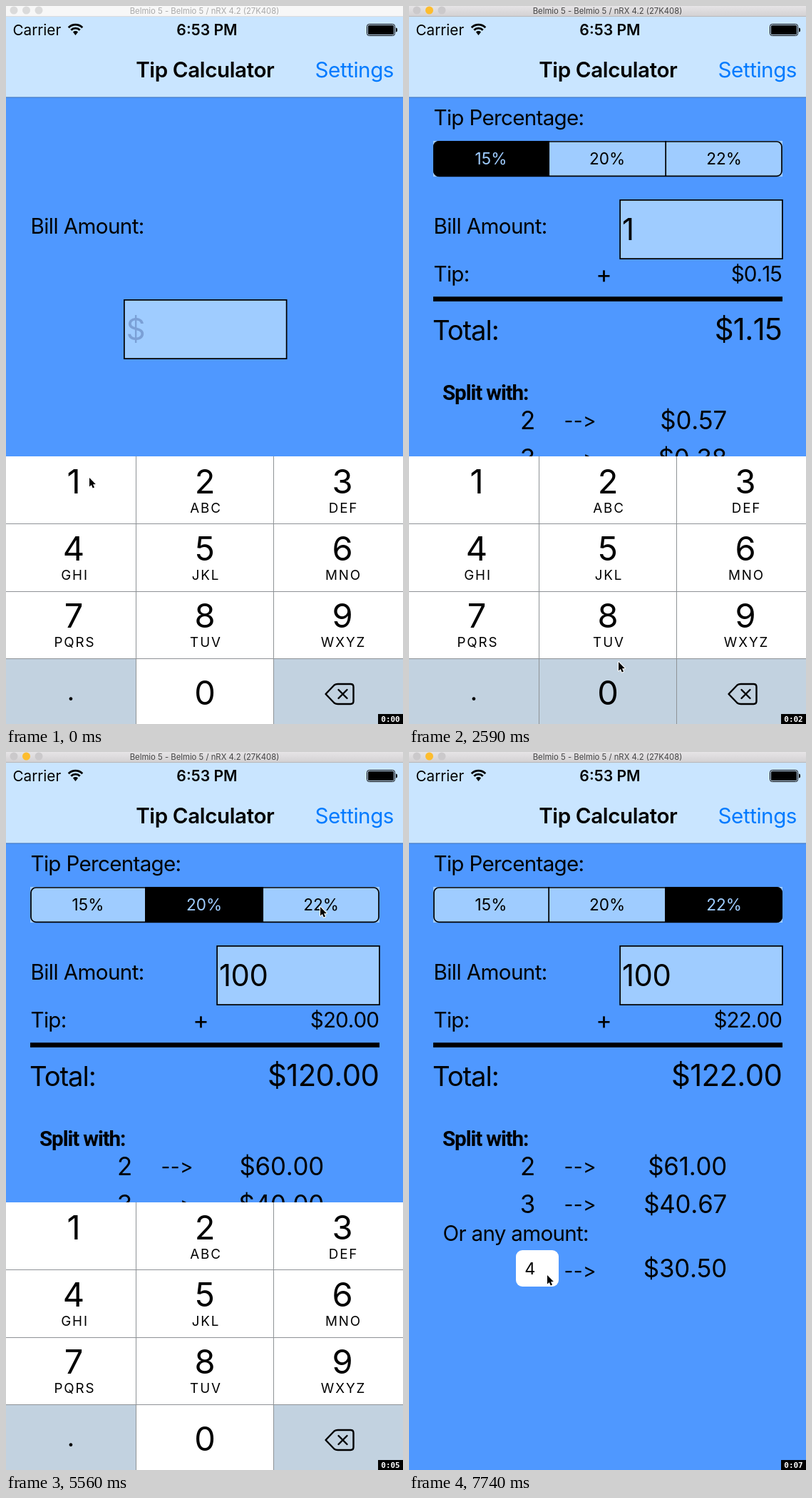
Write an HTML page with a canvas that moves like this. It is 557 px wide and 1006 px high and loops after 8000 ms.

```html
<!DOCTYPE html>
<html lang="en">
<head>
<meta charset="utf-8">
<title>Tip Calculator</title>
<style>
html, body { margin: 0; width: 100%; height: 100%; overflow: hidden; background: #4f98ff; }
canvas { display: block; }
</style>
</head>
<body>
<canvas id="stage" width="557" height="1006"></canvas>
<script>
const W = 557, H = 1006, LOOP = 8000;
const ctx = document.getElementById('stage').getContext('2d');

const BLUE = '#4f98ff', PALE = '#9fccff', BAR = '#c9e5ff', GREY_KEY = '#c2d2e0';
const UI = 'Inter, "Open Sans", sans-serif';
const TITLE = 'Belmio 5 - Belmio 5 / nRX 4.2 (27K408)';
const POINT = 1.74; // one screen point in pixels

const BURSTS = [0, 450, 1590, 2740, 3870, 5010, 6150, 6440, 7590];
const STEP = 137;

// Pointer path: time, x, y
const POINTER = [
  [0, 117, 661], [450, 117, 661], [600, 116, 664], [1000, 119, 668], [1270, 121, 672],
  [1730, 121, 672], [2400, 294, 919], [3290, 294, 919], [3700, 318, 520],
  [4010, 340, 320], [4418, 354, 238], [4690, 280, 214], [5010, 280, 214],
  [5284, 370, 212], [5558, 441, 217], [5832, 441, 217], [5969, 311, 521],
  [6150, 288, 539], [6300, 288, 539], [6577, 308, 779], [6850, 300, 775],
  [7399, 206, 737], [7727, 194, 733]
];

const BILL = [[0, ''], [1727, '1'], [2740, '10'], [3151, '100']];
const CHOICE = [[0, 0], [5010, 1], [5832, 2]];
const RATES = [15, 20, 22];
const KEYS = [
  ['1', ''], ['2', 'ABC'], ['3', 'DEF'],
  ['4', 'GHI'], ['5', 'JKL'], ['6', 'MNO'],
  ['7', 'PQRS'], ['8', 'TUV'], ['9', 'WXYZ'],
  ['.', ''], ['0', ''], ['', '']
];

const clamp = v => Math.min(1, Math.max(0, v));
const smooth = u => u * u * (3 - 2 * u);
const mix = (a, b, p) => a + (b - a) * p;
const within = (t, from, to) => t >= from && t < to;
const valueAt = (list, t) => list.filter(e => e[0] <= t).pop()[1];

function snap(t) {
  const start = BURSTS.filter(b => b <= t).pop();
  return start + Math.min(7, Math.floor((t - start) / STEP)) * STEP;
}

function pointerAt(t) {
  const i = POINTER.findIndex(k => k[0] > t);
  if (i < 0) return POINTER[POINTER.length - 1].slice(1);
  const a = POINTER[i - 1], b = POINTER[i];
  const p = (t - a[0]) / (b[0] - a[0]);
  return [mix(a[1], b[1], p), mix(a[2], b[2], p)];
}

function rect(x, y, w, h, color) {
  ctx.fillStyle = color;
  ctx.fillRect(x, y, w, h);
}

function text(str, x, y, size, o = {}) {
  ctx.font = `${o.weight || 400} ${size}px ${o.family || UI}`;
  ctx.letterSpacing = (o.track || 0) + 'px';
  ctx.fontKerning = o.kerning || 'auto';
  ctx.textAlign = o.align || 'left';
  ctx.fillStyle = o.color || '#000';
  ctx.fillText(str, x, y);
}

function dot(x, y, r, color) {
  ctx.fillStyle = color;
  ctx.beginPath();
  ctx.arc(x, y, r, 0, Math.PI * 2);
  ctx.fill();
}

function roundRect(x, y, w, h, r) {
  ctx.beginPath();
  ctx.roundRect(x, y, w, h, r);
}

function drawTitleBar(active) {
  if (active) {
    const g = ctx.createLinearGradient(0, 0, 0, 15);
    g.addColorStop(0, '#e6e4e6');
    g.addColorStop(1, '#d2d0d2');
    rect(0, 0, W, 15, g);
    rect(0, 14, W, 1, '#b9b7b9');
  } else {
    rect(0, 0, W, 15, '#f7f7f7');
    rect(0, 14, W, 1, '#dcdcdc');
  }
  const grey = active ? '#cbc9cb' : '#dadada';
  [grey, active ? '#fdbd2e' : grey, grey].forEach((c, i) => dot(11 + i * 17.5, 6, 5.5, c));
  text(TITLE, 278.5, 10.5, 11.3, { align: 'center', color: active ? '#444' : '#a9a9a9' });
}

function drawWifi(x, y) {
  const a = -Math.PI * 0.75, b = -Math.PI * 0.25;
  ctx.strokeStyle = '#000';
  ctx.lineWidth = 2.8;
  for (const r of [13.8, 8.8]) {
    ctx.beginPath();
    ctx.arc(x, y, r, a, b);
    ctx.stroke();
  }
  ctx.fillStyle = '#000';
  ctx.beginPath();
  ctx.moveTo(x, y + 1);
  ctx.arc(x, y, 5, a, b);
  ctx.fill();
}

function drawHeader() {
  rect(0, 15, W, 113, BAR);
  rect(0, 127.5, W, 1, '#3c73b8');
  text('Carrier', 9.5, 41, 20.7);
  drawWifi(97.5, 40);
  text('6:53 PM', 282, 41, 21.2, { weight: 600, align: 'center' });
  ctx.strokeStyle = '#000';
  ctx.lineWidth = 1;
  roundRect(506.5, 25.5, 39, 16, 3);
  ctx.stroke();
  ctx.fillStyle = '#000';
  roundRect(508, 27, 36, 13, 1.5);
  ctx.fill();
  roundRect(547, 30.5, 2, 6, [0, 2, 2, 0]);
  ctx.fill();
  text('Tip Calculator', 279.3, 100, 29.6, { weight: 600, align: 'center', track: -0.4 });
  text('Settings', 544, 100, 29.6, { align: 'right', track: -0.45, color: '#007aff' });
}

function drawSegments(chosen, pressed) {
  const edges = [34, 196, 360, 524];
  rect(34, 189, 490, 50, PALE);
  ctx.save();
  roundRect(34, 189, 490, 50, 8);
  ctx.clip();
  RATES.forEach((rate, i) => {
    const x = edges[i], w = edges[i + 1] - x;
    if (i === chosen) rect(x - 1, 189, w + 2, 50, '#000');
    else if (i === pressed) rect(x, 189, w, 50, 'rgba(0,0,0,.15)');
  });
  rect(195.3, 189, POINT, 50, '#000');
  rect(359.3, 189, POINT, 50, '#000');
  ctx.restore();
  ctx.strokeStyle = '#000';
  ctx.lineWidth = POINT;
  roundRect(35, 190, 488, 48.3, 7);
  ctx.stroke();
  RATES.forEach((rate, i) => text(rate + '%', (edges[i] + edges[i + 1]) / 2, 222, 22.6,
    { align: 'center', kerning: 'none', color: i === chosen ? PALE : '#000' }));
}

function drawArrow(y) {
  ['-', '-', '>'].forEach((c, i) => text(c, 217.5 + i * 13.2, y, 28));
}

function drawResults(bill, chosen, pressed, alpha) {
  const body = { track: -0.7 };
  const money = (v, x, y, size, track) =>
    text('$' + v.toFixed(2), x, y, size, { align: 'right', kerning: 'none', track });
  const tip = bill * RATES[chosen] / 100;
  const total = bill + tip;

  ctx.save();
  ctx.globalAlpha = alpha;
  text('Tip Percentage:', 34.5, 167, 29.6, body);
  drawSegments(chosen, pressed);
  text('Tip:', 34.5, 386, 29.6, body);
  text('+', 273.5, 387.5, 34, { align: 'center' });
  money(tip, 523, 386, 29.6, -0.9);
  rect(34, 407.2, 490, 6.7, '#000');
  text('Total:', 33, 467.5, 38.3, { track: -1.1 });
  money(total, 523.3, 467.5, 41.8, -0.6);
  text('Split with:', 47, 552, 29.6, { weight: 700, family: 'Roboto, sans-serif', track: -1.1 });
  [[2, 593], [3, 646], [4, 736]].forEach(([n, y]) => {
    if (n < 4) text(n, 166.5, y, 34.8, { align: 'center' });
    drawArrow(n < 4 ? y - 2 : y + 1);
    money(total / n, 446, y, 34.8, -0.2);
  });
  text('Or any amount:', 47.5, 685, 29.6, body);
  ctx.fillStyle = '#fff';
  roundRect(150, 698, 60, 51, 9);
  ctx.fill();
  text('4', 162.3, 732, 23.4);
  ctx.restore();
}

function drawField(value, p) {
  const x = mix(165, 295.3, p), y = mix(411, 271, p);
  rect(x, y, 229.5, 84, '#000');
  rect(x + POINT, y + POINT, 229.5 - 2 * POINT, 84 - 2 * POINT, PALE);
  text(value || '$', x + 3.8, y + 57, 41.8,
    { track: -0.5, kerning: 'none', color: value ? '#000' : '#7ba0d6' });
}

function drawBackspace(x, y) {
  ctx.strokeStyle = '#000';
  ctx.lineWidth = 2.4;
  ctx.lineJoin = ctx.lineCap = 'round';
  ctx.beginPath();
  ctx.moveTo(x, y);
  ctx.lineTo(x + 12, y - 12.5);
  ctx.quadraticCurveTo(x + 14, y - 14, x + 17, y - 14);
  ctx.lineTo(x + 35, y - 14);
  ctx.quadraticCurveTo(x + 39, y - 14, x + 39, y - 10);
  ctx.lineTo(x + 39, y + 10);
  ctx.quadraticCurveTo(x + 39, y + 14, x + 35, y + 14);
  ctx.lineTo(x + 17, y + 14);
  ctx.quadraticCurveTo(x + 14, y + 14, x + 12, y + 12.5);
  ctx.closePath();
  ctx.moveTo(x + 18, y - 6);
  ctx.lineTo(x + 30, y + 6);
  ctx.moveTo(x + 30, y - 6);
  ctx.lineTo(x + 18, y + 6);
  ctx.stroke();
}

function drawKeyboard(drop, held) {
  const cols = [0, 182, 375, W], rows = [631, 725, 820, 914, H];
  const centers = [95, 279, 472];
  ctx.save();
  ctx.translate(0, drop);
  rect(0, 631, W, 375, '#fff');
  KEYS.forEach(([digit, letters], i) => {
    const c = i % 3, r = Math.floor(i / 3);
    if (i === 9 || i === 11 || (held && digit === held)) {
      rect(cols[c], rows[r], cols[c + 1] - cols[c], rows[r + 1] - rows[r], GREY_KEY);
    }
    const y = r < 3 ? 682.7 + r * 94.2 : 979;
    if (digit === '.') text('.', 91, 973, 36, { align: 'center' });
    else text(digit, centers[c], y, 47, { align: 'center' });
    text(letters, centers[c] + 1.5, y + 27, 18.8, { align: 'center', track: 1.9 });
  });
  drawBackspace(448.5, 964);
  for (const y of rows.slice(1, 4)) rect(0, y, W, 1, '#8e9296');
  for (const x of cols.slice(1, 3)) rect(x, 631, 1, 375, '#8e9296');
  ctx.restore();
}

function drawPointer(x, y) {
  ctx.save();
  ctx.translate(x, y);
  ctx.beginPath();
  [[0, 0], [0, 12.5], [2.8, 10], [4.8, 14.6], [7, 13.6], [5, 9.2], [8.8, 9]]
    .forEach(p => ctx.lineTo(...p));
  ctx.closePath();
  ctx.lineJoin = 'round';
  ctx.lineWidth = 2;
  ctx.strokeStyle = '#fff';
  ctx.stroke();
  ctx.fillStyle = '#000';
  ctx.fill();
  ctx.restore();
}

function drawClock(t) {
  rect(522, 992, 35, 14, '#000');
  text('0:0' + Math.floor(t / 1000), 539.5, 1002.5, 11,
    { weight: 700, align: 'center', color: '#fff', family: '"DejaVu Sans Mono", monospace' });
}

function draw(time) {
  const t = snap(time);
  const value = valueAt(BILL, t), chosen = valueAt(CHOICE, t);
  const reveal = smooth(clamp((t - 1692) / 400));
  const pressed = within(t, 4800, 5010) ? 1 : within(t, 5690, 5832) ? 2 : -1;
  const held = within(t, 1590, 1727) ? '1'
    : within(t, 2540, 2740) || within(t, 3010, 3151) ? '0' : '';
  const s = Math.max(0, t - 6330) * 0.0255;
  const drop = 376 * (1 - (1 + s) * Math.exp(-s));

  rect(0, 0, W, H, BLUE);
  drawTitleBar(t >= 1590);
  drawHeader();
  text('Bill Amount:', 34.5, 319, 29.6, { track: -0.6 });
  if (reveal > 0) drawResults(+value, chosen, pressed, Math.pow(reveal, 0.8));
  drawField(value, reveal);
  if (t < 6700) drawKeyboard(drop, held);
  drawClock(time);
  drawPointer(...pointerAt(t));
}

const begin = performance.now();
function tick() {
  draw((performance.now() - begin) % LOOP);
  requestAnimationFrame(tick);
}
tick();
</script>
</body>
</html>
```
